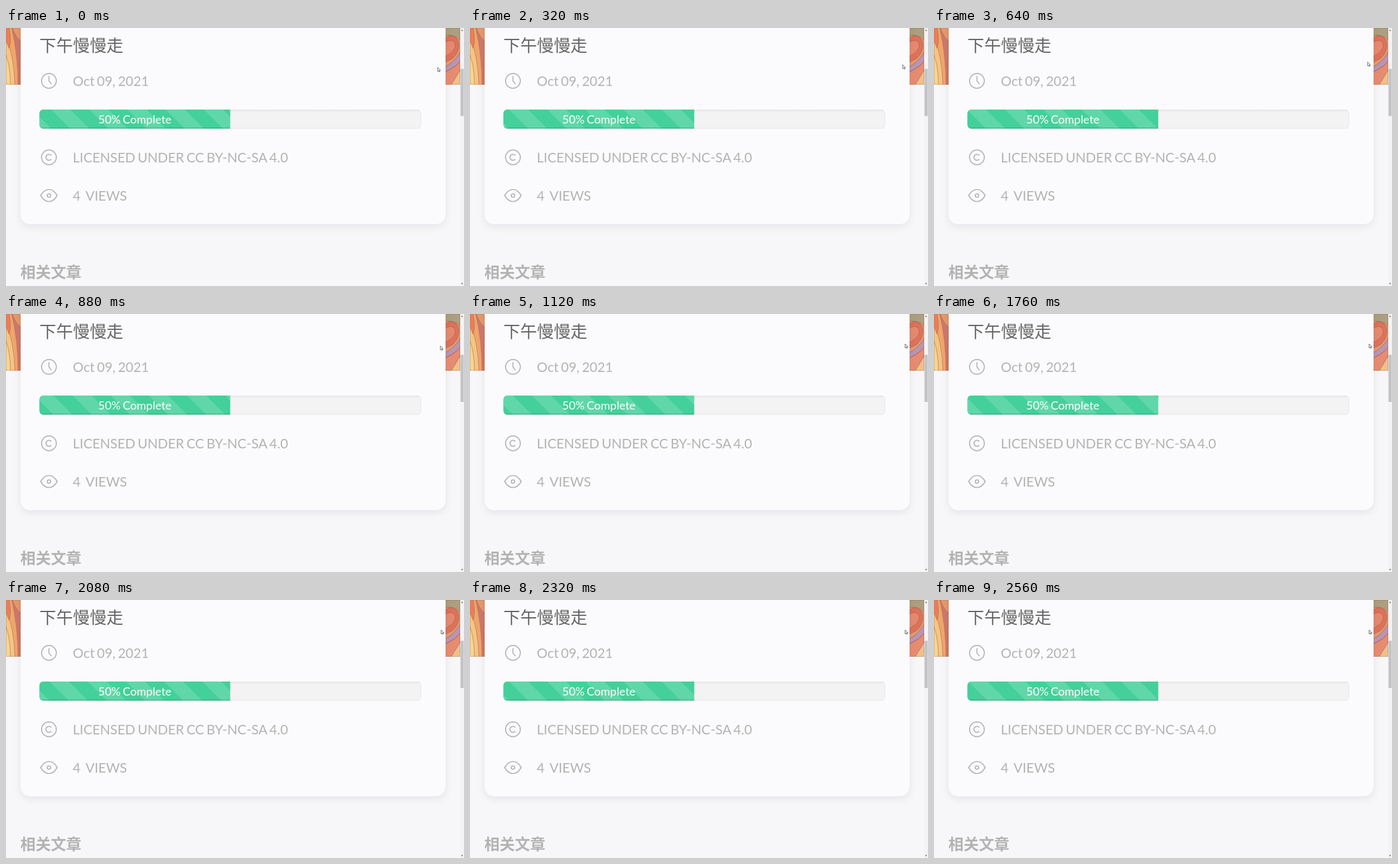
Animation, 720 px wide and 405 px high, one loop 2.64 s. Source, as an HTML page:

```html
<!DOCTYPE html>
<html lang="zh">
<head>
<meta charset="utf-8">
<style>
  html, body { margin: 0; height: 100%; overflow: hidden; background: #f7f7f9; }
  svg { display: block; width: 720px; height: 405px; }
  text { font-family: Lato, "Noto Sans CJK SC", "Noto Sans CJK", sans-serif; fill: #b3b3b3; word-spacing: -.076em; }
  .meta { font-size: 21px; }
  .icon { fill: none; stroke: #b6b6b6; stroke-width: 1.7; stroke-linecap: round; stroke-linejoin: round; }
</style>
</head>
<body>
<svg viewBox="0 0 720 405">
  <defs>
    <filter id="soft" x="-10%" y="-10%" width="120%" height="125%">
      <feDropShadow dx="0" dy="4" stdDeviation="6" flood-color="#223" flood-opacity=".08"/>
    </filter>
    <linearGradient id="inset" x2="0" y2="1">
      <stop offset="0" stop-color="#e5e5e6"/>
      <stop offset=".14" stop-color="#f3f3f4"/>
    </linearGradient>
    <pattern id="stripes" width="60" height="30" patternUnits="userSpaceOnUse">
      <path d="M0 0H30L60 30H30Z" fill="#fff" fill-opacity=".15"/>
    </pattern>
    <clipPath id="bar"><path d="M352.5 128V158H58.5a6 6 0 0 1-6-6V134a6 6 0 0 1 6-6Z"/></clipPath>
    <clipPath id="left"><path d="M0 0H23V89H0Z"/></clipPath>
    <clipPath id="right"><path d="M690 0H714V89H690Z"/></clipPath>
  </defs>

  <g clip-path="url(#left)" stroke="#b0654f" stroke-width=".6">
    <path d="M0 0H23V89H0Z" fill="#cb7a6c"/>
    <path d="M0 0H9Q19 42 19 89H0Z" fill="#efa66d"/>
    <path d="M0 14Q13 46 14 89H0Z" fill="#f4c583"/>
    <path d="M0 42Q7 62 7 89H0Z" fill="#f6d593"/>
    <path d="M0 0H5Q9 18 5 32L0 20Z" fill="#ea8058"/>
    <path d="M10 0H23V20Q16 16 10 0Z" fill="#e39a6d"/>
  </g>
  <g clip-path="url(#right)" stroke="#9c5c55" stroke-width=".6">
    <path d="M690 0H714V89H690Z" fill="#e29a72"/>
    <path d="M690 0H714V19Q704 9 690 12Z" fill="#aaa07f"/>
    <path d="M690 16Q703 6 711 20Q715 36 702 48L690 54Z" fill="#df7259"/>
    <path d="M690 23Q701 15 706 25Q708 36 690 45Z" fill="#e58a70"/>
    <path d="M690 61Q704 55 714 38V52Q706 62 690 69Z" fill="#b896b4"/>
    <path d="M690 69Q706 63 714 52V70L704 89H690Z" fill="#e78c71"/>
    <path d="M714 66L700 89H714Z" fill="#f0c08a"/>
  </g>

  <rect x="23" y="-40" width="668" height="348" rx="15" fill="#fbfbfd" filter="url(#soft)"/>
  <text x="52.5" y="36.5" font-size="26.4" style="fill:#666">下午慢慢走</text>

  <g class="icon">
    <circle cx="67.5" cy="83" r="11.6"/>
    <path d="M67.5 76V83L71 87.5"/>
    <circle cx="67.5" cy="203" r="11.6"/>
    <path d="M70.8 199.7a4.7 4.7 0 1 0 0 6.6"/>
    <path d="M54.5 263Q60 253.5 67.5 253.5T80.5 263Q75 272.5 67.5 272.5T54.5 263Z"/>
    <circle cx="67.5" cy="263" r="2.7"/>
  </g>
  <text class="meta" x="105" y="91">Oct 09, 2021</text>
  <text class="meta" x="105" y="211">LICENSED UNDER CC BY-NC-SA 4.0</text>
  <text class="meta" x="105" y="271">4</text>
  <text class="meta" x="125" y="271">VIEWS</text>

  <rect x="52.5" y="128" width="600" height="30" rx="6" fill="url(#inset)"/>
  <rect x="53" y="128.5" width="599" height="29" rx="5.5" fill="none" stroke="#e8e8e9"/>
  <g clip-path="url(#bar)">
    <path d="M52 128H353V158H52Z" fill="#43d09a"/>
    <path id="moving" d="M-60 0H420V30H-60Z" fill="url(#stripes)"/>
    <path d="M52 156.5H353V158H52Z" fill="#000" fill-opacity=".15"/>
  </g>
  <text x="202.5" y="150" font-size="18" text-anchor="middle" style="fill:#fff">50% Complete</text>

  <text x="22.5" y="392" font-size="24" font-weight="700">相关文章</text>

  <path d="M714 0H720V405H714Z" fill="#f3f3f4"/>
  <path d="M714.5 64H719.5V138H714.5Z" fill="#c3c3c5"/>
  <path d="M715.5 4.5L717 2.5L718.5 4.5ZM715.5 400.5L717 402.5L718.5 400.5Z" fill="#555"/>

  <path id="cursor" d="M0 0V6.2L1.5 4.9L2.5 7L3.5 6.5L2.6 4.5H4.4Z" fill="#fff" stroke="#555" stroke-width=".8"/>
</svg>
<script>
  const LOOP = 2640, STEP = 80, PERIOD = 2000, TILE = 60;
  const moving = document.getElementById("moving");
  const cursor = document.getElementById("cursor");

  function draw(now) {
    const t = Math.floor((now % LOOP) / STEP) * STEP;
    const shift = 71 - (t / PERIOD * TILE) % TILE;
    moving.setAttribute("transform", `translate(${shift} 128)`);
    const p = Math.min(t / 1120, 1);
    cursor.setAttribute("transform", `translate(${678.7 + 5.3 * p} ${62 - 15 * p})`);
    requestAnimationFrame(draw);
  }
  requestAnimationFrame(draw);
</script>
</body>
</html>
```
